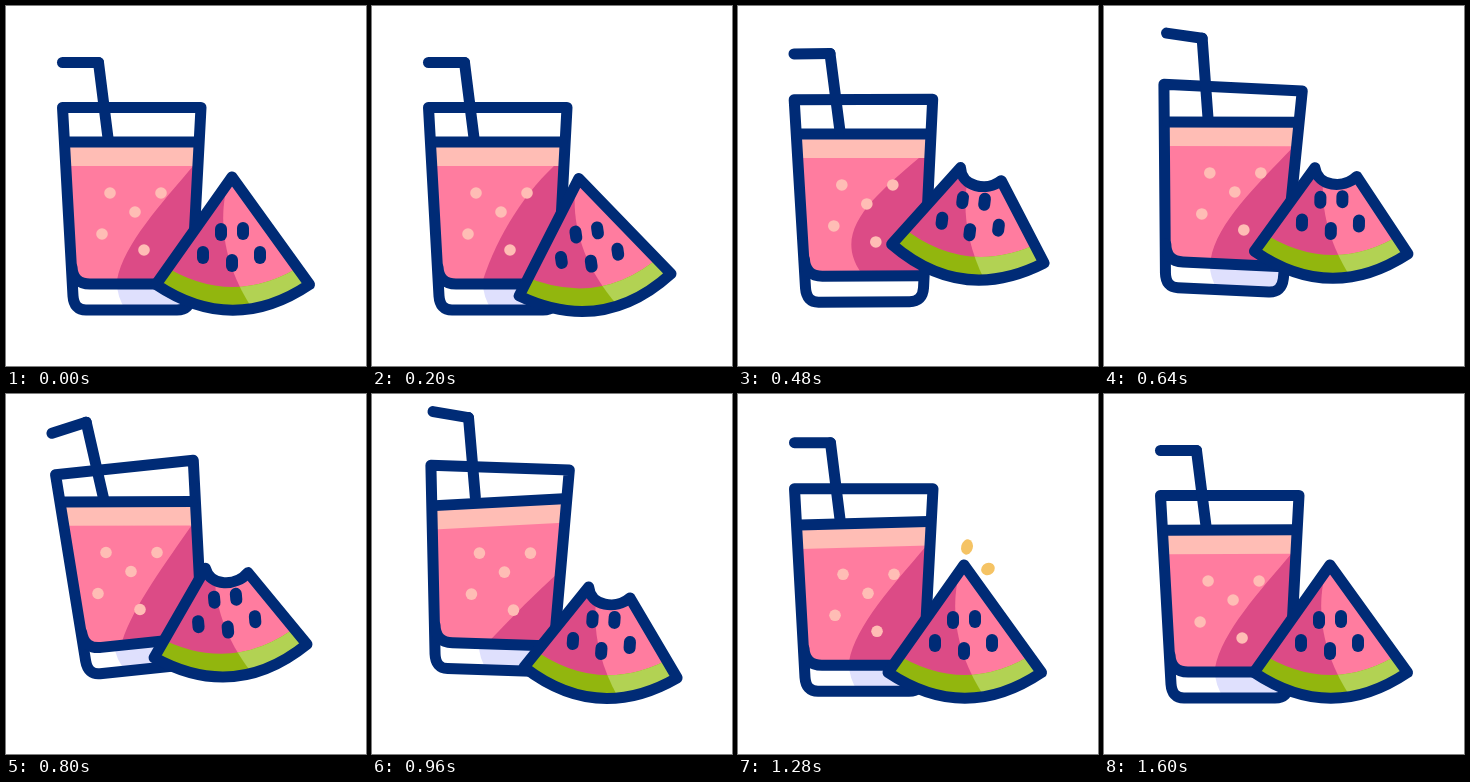
These frames come from a looping animation (360 by 360 pixels, 2 s). An HTML page with a canvas:

```html
<!DOCTYPE html>
<html>
<head>
<meta charset="utf-8">
<style>
html, body { margin: 0; width: 100%; height: 100%; overflow: hidden; background: #fff; }
canvas { display: block; width: 360px; height: 360px; }
</style>
</head>
<body>
<canvas id="stage" width="360" height="360"></canvas>
<script>
const ctx = document.getElementById('stage').getContext('2d');
const LOOP = 2000, STEP = 40, RAD = Math.PI / 180;
const NAVY = '#002b76', PINK = '#ff7c9f', DARK = '#dc4b86', CREAM = '#ffbdb5';
const LAVENDER = '#dfe0fd', GREEN = '#b2d253', OLIVE = '#92b60e', GOLD = '#f5c364';
const BITE_START = 400, BITE_END = 1160;

const ease = u => (1 - Math.cos(Math.PI * Math.min(1, Math.max(0, u)))) / 2;
const pulse = (t, peak, width) => Math.exp(-(((t - peak) / width) ** 2));

// Swing that peaks at 800 ms, builds up quickly and fades over the given time.
function wobble(t, fade) {
  const d = t - 800;
  return Math.cos(Math.PI * d / 160) * pulse(d, 0, d < 0 ? 180 : fade);
}

// Eased path through a few [time, value] poses.
function poses(t, ...keys) {
  let value = keys[0][1];
  for (let i = 1; i < keys.length; i++) {
    const [t0, v0] = keys[i - 1], [t1, v1] = keys[i];
    value += (v1 - v0) * ease((t - t0) / (t1 - t0));
  }
  return value;
}

const bubbles = [[104, 187], [155, 187], [129, 206], [96, 228], [138, 244]];
const seeds = [[215, 226], [237, 225], [197, 249], [226, 257], [254, 249]];

function group(draw) { ctx.save(); draw(); ctx.restore(); }
function turn(x, y, degrees) {
  ctx.translate(x, y);
  ctx.rotate(degrees * RAD);
  ctx.translate(-x, -y);
}
function fill(path, color) { ctx.fillStyle = color; ctx.fill(new Path2D(path)); }
function stroke(path, width = 11) {
  ctx.strokeStyle = NAVY;
  ctx.lineWidth = width;
  ctx.stroke(new Path2D(path));
}
function oval(x, y, rx, ry, color, angle = 0) {
  ctx.fillStyle = color;
  ctx.beginPath();
  ctx.ellipse(x, y, rx, ry, angle * RAD, 0, 7);
  ctx.fill();
}

// Dark side of the drink: its edge swirls before the jump and drops on the way down.
function shadePath(t) {
  const a = pulse(t, 320, 100), b = pulse(t, 480, 100), drop = pulse(t, 960, 110);
  const top = 159 - 19 * a - 3 * b + 45 * drop;
  const bottom = 111 + 11 * b + 11 * drop - 7 * pulse(t, 800, 90);
  return `M188 ${top}C${155 - 5 * a - 20 * b + 11 * drop} ${198 - 58 * a + 5 * b + 27 * drop}
    ${118 + 30 * a - 26 * b + 26 * drop} ${238 - 33 * a - 3 * b + 11 * drop} ${bottom} 274V280H200V${top}Z`;
}

function drawGlass(t) {
  const lift = 29.5 * ease(1 - Math.abs(t - 870) / 600);
  const swing = wobble(t, 150);
  const slope = 64 * Math.tan(5.8 * RAD * wobble(t, 413));
  const left = 136 - slope, right = 136 + slope;
  const base = 111 + 80 * pulse(t, 480, 70) - 14 * pulse(t, 800, 90);
  const body = 'M56.5 101.5H195L185 290Q184 304 171 304H80Q68 304 67 290Z';
  const place = () => {
    ctx.translate(4 * swing, -lift);
    turn(125, 210, -6 * swing);
  };

  group(() => {
    place();
    ctx.clip(new Path2D(body));
    fill(`M${base} 276Q${base} 292 ${base + 9} 304H200V276Z`, LAVENDER);
    ctx.clip(new Path2D(`M50 ${left}L200 ${right}V278H83Q69 278 68 263Z`));
    fill('M50 80H200V280H50Z', PINK);
    fill(shadePath(t), DARK);
    fill(`M62 ${left}L190 ${right}V${right + 24}L62 ${left + 24}Z`, CREAM);
  });

  const drift = -4 * wobble(t, 413);
  for (const [x, y] of bubbles) oval(x + drift, y - lift, 5.8, 5.8, CREAM);

  group(() => {
    place();
    stroke(body);
    stroke(`M62 ${left}L190 ${right}`);
    stroke('M66 261Q67 278 84 278H184');
    const slide = lift / 7;
    ctx.translate(0, -slide);
    stroke(`M92.5 56.5L102 ${132 + slide}`);
    turn(92.5, 56.5, -12 * wobble(t, 240));
    stroke('M56.5 56.5H92.5');
  });
}

function drawSlice(t) {
  const hop = poses(t, [320, 0], [500, -32], [700, -32], [960, 0]);
  const angle = poses(t, [0, 0], [320, -12], [480, 7], [800, -5], [960, 4], [1240, 0]);
  const bitten = t >= BITE_START && t < BITE_END;
  const top = bitten ? 'M209 194C212 213 238 215 251 202' : 'M226 171';
  const outline = top + 'L303.5 278.5Q227 330 150 278.5Z';
  group(() => {
    ctx.translate(0, hop);
    turn(227, 304, angle);
    group(() => {
      ctx.clip(new Path2D(outline));
      const lit = 'M226 165C212 200 212 250 246 302H310V165Z';
      const rind = 'M155 258Q227 304 298 258V320H155Z';
      fill('M140 160H310V310H140Z', DARK);
      fill(lit, PINK);
      fill(rind, OLIVE);
      ctx.clip(new Path2D(lit));
      fill(rind, GREEN);
    });
    stroke(outline);
    for (const [x, y] of seeds) stroke(`M${x} ${y - 3}v6`, 12);
  });
}

function drawSparks(t) {
  const u = (t - 1160) / 240;
  if (u <= 0 || u >= 1) return;
  const size = Math.min(1, 4 * u, 4 * (1 - u)), reach = 10 * (u - .5);
  oval(229 + reach * .2, 153 - reach, 5.8 * size, 7.8 * size, GOLD, 14);
  oval(250 + reach, 175 - reach * .4, 7 * size, 6 * size, GOLD, -25);
}

const start = performance.now();
function frame(now) {
  const t = Math.floor(Math.max(0, now - start) % LOOP / STEP) * STEP;
  ctx.fillStyle = '#fff';
  ctx.fillRect(0, 0, 360, 360);
  ctx.lineCap = ctx.lineJoin = 'round';
  drawGlass(t);
  drawSparks(t);
  drawSlice(t);
  requestAnimationFrame(frame);
}
frame(start);
</script>
</body>
</html>
```
